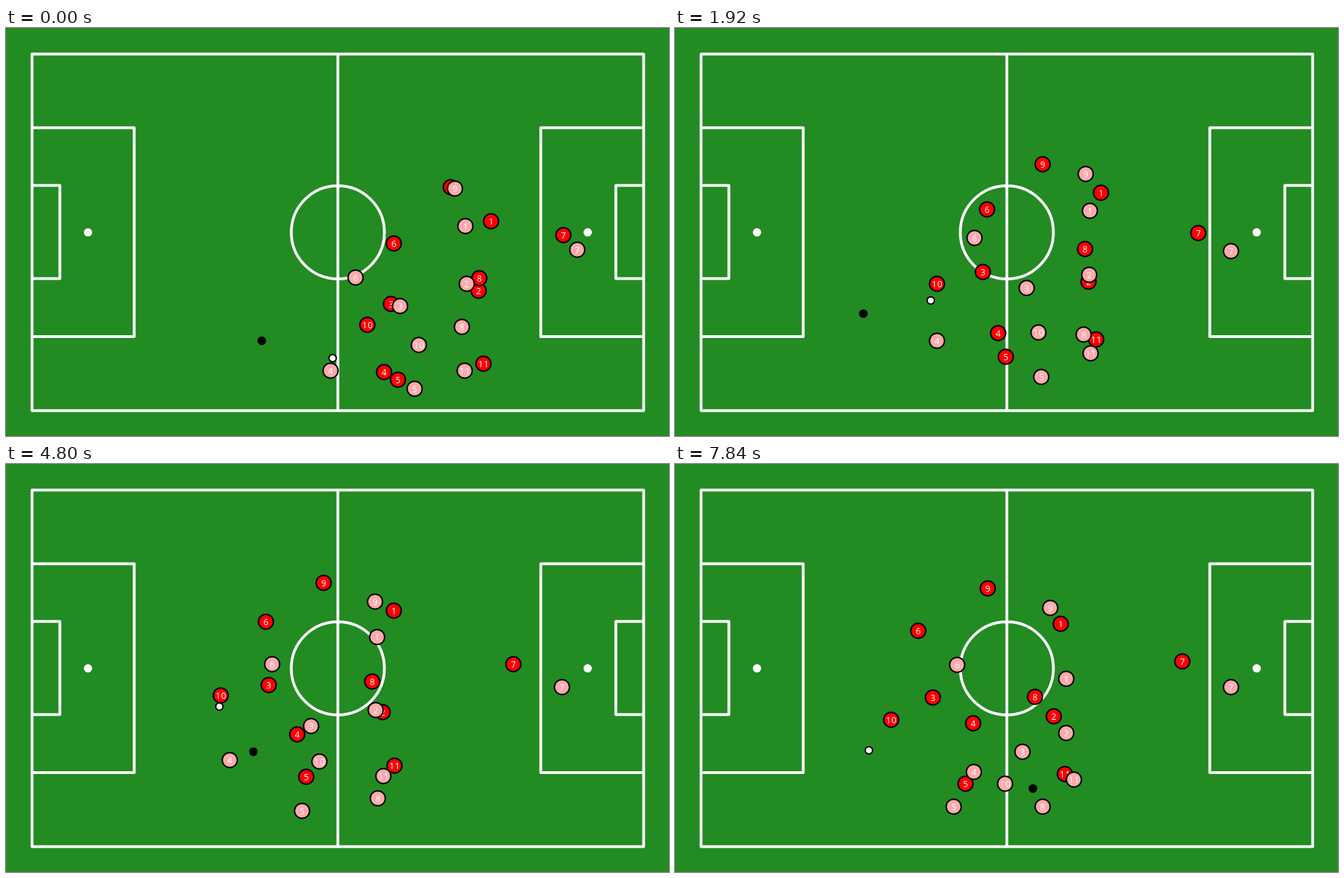
Recreate the animation shown at these times as an HTML page with a canvas. Size 954 by 587 pixels, loop 8000 ms.

```html
<!DOCTYPE html>
<html lang="en">
<head>
<meta charset="utf-8">
<title>Match tracking</title>
<style>
  html, body { margin: 0; width: 100%; height: 100%; overflow: hidden; background: #228b22; }
  canvas { display: block; }
</style>
</head>
<body>
<canvas id="pitch" width="954" height="587"></canvas>
<script>
const ctx = document.getElementById("pitch").getContext("2d");
const LOOP = 8000, STEP = 160;
const RED = "#ff0000", PINK = "#ffaaaa";

// Runs have four waypoints; a fifth, before the last, marks a late turn.
const RUN = [0, 1920, 4800, 7840];
const LATE_TURN = [0, 1920, 4800, 6560, 7840];

// Smooth curve through unevenly spaced values.
function curve(times, values) {
  const last = times.length - 1;
  const spans = times.slice(1).map((t, i) => t - times[i]);
  const rates = spans.map((span, i) => (values[i + 1] - values[i]) / span);
  const slopes = times.map((_, i) => i === 0 || i === last ? 0 :
    (rates[i - 1] * spans[i] + rates[i] * spans[i - 1]) / (spans[i - 1] + spans[i]));
  slopes[0] = 1.5 * rates[0] - 0.5 * slopes[1];
  slopes[last] = 1.5 * rates[last - 1] - 0.5 * slopes[last - 1];

  return time => {
    let i = 0;
    while (i < last - 1 && time >= times[i + 1]) i++;
    const span = spans[i], u = (time - times[i]) / span, v = 1 - u;
    return v * v * ((1 + 2 * u) * values[i] + u * span * slopes[i])
         + u * u * ((3 - 2 * u) * values[i + 1] - v * span * slopes[i + 1]);
  };
}

const actors = [];
function actor(draw, ...waypoints) {
  const times = waypoints.length === LATE_TURN.length ? LATE_TURN : RUN;
  const [x, y] = [0, 1].map(axis => curve(times, waypoints.map(point => point[axis])));
  actors.push({ draw, x, y });
}

function player(color, number, ...waypoints) {
  actor((x, y) => {
    disc(x, y, 11.8, "#000");
    disc(x, y, 9.8, color);
    ctx.fillStyle = "#fff";
    ctx.fillText(number, x + 0.4, y + 4.5);
  }, ...waypoints);
}

player(RED, 1, [698, 278], [613, 237], [558, 211], [555, 230]);
player(RED, 2, [680, 378], [595, 365], [542, 357], [545, 363]);
player(RED, 3, [554, 397], [443, 351], [378, 318], [371, 336]);
player(RED, 4, [544, 495], [465, 439], [419, 389], [429, 373]);
player(RED, 5, [564, 506], [476, 473], [432, 450], [418, 460]);
player(RED, 6, [558, 310], [449, 261], [374, 227], [350, 240]);
player(RED, 7, [802, 298], [753, 295], [730, 288], [730, 284]);
player(RED, 8, [681, 360], [590, 318], [527, 313], [518, 335]);
player(RED, 9, [640, 229], [529, 196], [457, 171], [450, 179]);
player(RED, 10, [520, 427], [377, 368], [309, 333], [311, 368]);
player(RED, 11, [687, 483], [606, 448], [559, 434], [561, 446]);

player(PINK, 1, [661, 285], [597, 263], [534, 249], [563, 309]);
player(PINK, 2, [663, 368], [596, 355], [532, 354], [563, 387]);
player(PINK, 3, [567, 400], [506, 374], [439, 377], [500, 414]);
player(PINK, 4, [467, 493], [377, 450], [322, 426], [391, 430], [430, 443]);
player(PINK, 5, [588, 519], [527, 502], [426, 499], [386, 495], [401, 493]);
player(PINK, 6, [503, 359], [431, 302], [383, 288], [406, 289]);
player(PINK, 7, [822, 319], [800, 321], [800, 321], [800, 321]);
player(PINK, 8, [656, 430], [588, 441], [535, 481], [524, 503], [529, 493]);
player(PINK, 9, [646, 231], [591, 210], [531, 198], [540, 207]);
player(PINK, 10, [594, 456], [523, 438], [451, 428], [475, 460]);
player(PINK, 11, [660, 493], [598, 468], [543, 449], [574, 454]);

const referee = (x, y) => disc(x, y, 6.2, "#000");
actor(referee, [368, 450], [271, 411], [356, 414], [406, 448], [515, 467]);

const ball = (x, y) => {
  disc(x, y, 6.2, "#000");
  disc(x, y, 4.3, "#fff");
};
actor(ball, [470, 475], [368, 392], [307, 349], [277, 380], [279, 412]);

function disc(x, y, radius, color) {
  ctx.fillStyle = color;
  ctx.beginPath();
  ctx.arc(x, y, radius, 0, 2 * Math.PI);
  ctx.fill();
}

function drawPitch() {
  ctx.fillStyle = "#228b22";
  ctx.fillRect(0, 0, 954, 587);
  ctx.strokeStyle = "#fff";
  ctx.lineWidth = 4;
  ctx.lineJoin = "round";
  ctx.beginPath();
  ctx.rect(37.5, 37.5, 880, 513);
  ctx.rect(37.5, 143.5, 147, 300.5);
  ctx.rect(769.5, 143.5, 148, 300.5);
  ctx.rect(37.5, 226.5, 40, 134);
  ctx.rect(877.5, 226.5, 40, 134);
  ctx.moveTo(477.5, 37.5);
  ctx.lineTo(477.5, 550.5);
  ctx.moveTo(544.5, 294);
  ctx.arc(477.5, 294, 67, 0, 2 * Math.PI);
  ctx.stroke();
  disc(118, 294, 6, "#fff");
  disc(837, 294, 6, "#fff");
}

function render(now) {
  const time = Math.floor((now % LOOP) / STEP) * STEP;
  drawPitch();
  ctx.font = "12.5px 'Open Sans', sans-serif";
  ctx.letterSpacing = "0.8px";
  ctx.textAlign = "center";
  for (const { draw, x, y } of actors) draw(x(time), y(time));
}

function tick() {
  render(performance.now());
  requestAnimationFrame(tick);
}
tick();
</script>
</body>
</html>
```
